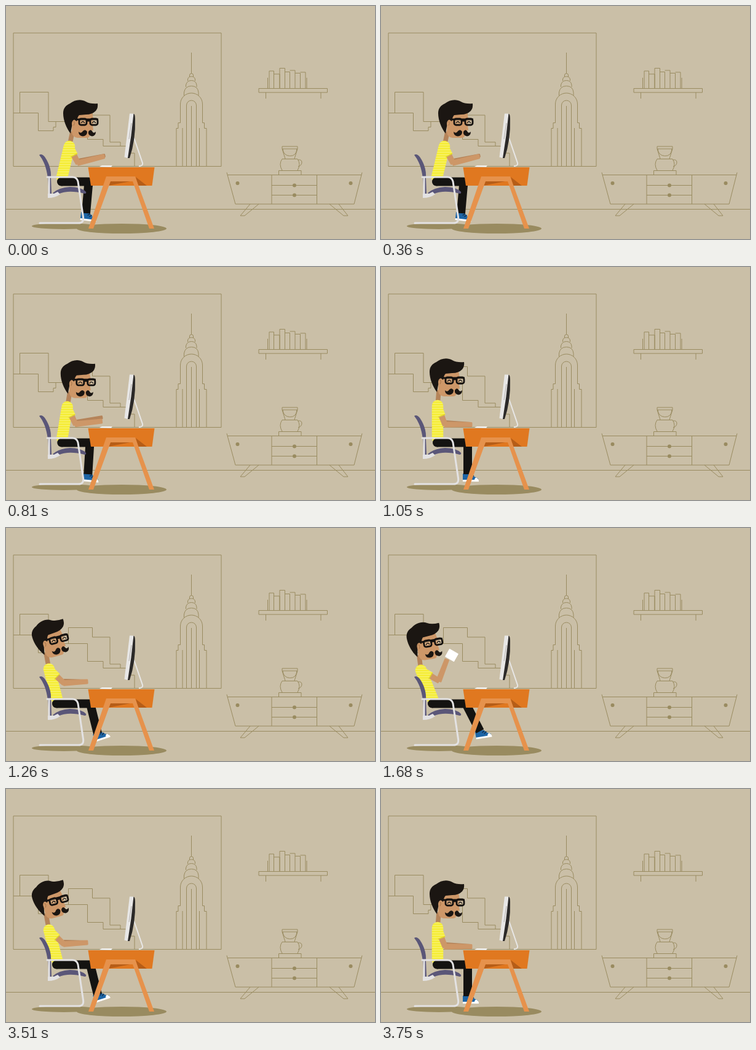
Recreate the animation shown at these times as an HTML page. Size 600x380 px, loop 3.81 s.

```html
<!DOCTYPE html>
<html lang="en">
<head>
<meta charset="utf-8">
<title>Desk break</title>
<style>
  html, body { margin: 0; width: 100%; height: 100%; overflow: hidden; background: #cabfa7; }
  svg { display: block; width: 600px; height: 380px; }
  .line { fill: none; stroke: #998b60; stroke-width: 1; }
  .dot { fill: #998b60; }
  .ink { fill: #1b1612; }
  .skin { fill: #cd9768; stroke: #cd9768; }
  .shade { fill: #b5845a; stroke: #b5845a; }
  .limb { stroke-width: 3; stroke-linejoin: round; }
  .metal { fill: none; stroke: #e3e2e3; stroke-width: 3; stroke-linejoin: round; stroke-linecap: round; }
</style>
</head>
<body>
<svg viewBox="0 0 600 380">
  <defs>
    <pattern id="knit" width="8" height="4" patternUnits="userSpaceOnUse">
      <rect width="8" height="4" fill="#f5ed3a"/>
      <rect y="2" width="8" height="1" fill="#f8f378"/>
    </pattern>
  </defs>
  <rect width="600" height="380" fill="#cabfa7"/>

  <g class="line">
    <path d="M0 331.5H600M12 44H350V261.5H12Z"/>
    <!-- skyline -->
    <path d="M12 174.5H52.5V203.5H77V197.5H81V188.5"/>
    <path d="M22.5 174V140.5H69V188.5H132.5V217.5H158V228.5H186"/>
    <path d="M101.5 188V162.5H140.5V178H169V222H186V228.5H196V240H209V262"/>
    <!-- tower -->
    <path d="M301.5 76V110M298.5 115V113Q298.5 110 301.5 110T304.5 113V115"/>
    <path d="M295.5 122V120Q296 115 301.5 115T307.5 120V122"/>
    <path d="M292.5 132V129Q294 121.5 301.5 121.5T310 129V132"/>
    <path d="M289.5 146V141Q291 130.5 301.5 130.5T313 141V146"/>
    <path d="M277 262V199.5H280V190.5H283.5V160A18 18 0 0 1 319.5 160V190.5H322.5V199.5H326V262"/>
    <path d="M293.5 262V162A8 8 0 0 1 309.5 162V262M287 199V262M301.5 163V262M314.500 199V262"/>
    <!-- shelf -->
    <path d="M411 134.5H522.5V141H411ZM422.5 141V151M512 141V151M425.5 134V117M489 134V117"/>
    <path d="M428 134V106H435.5V134M435.5 111H445V134M445 134V101.5H453.5V134M453.5 107.5H461.5V134M461.5 105H470V134M470 109.5H478.5V134M478.5 108H487V134"/>
    <!-- sideboard -->
    <path d="M359 271.5L373 323H566L579 271.5M360 275.5H578M432 276V323M505.5 276V323M432 292.5H505.5M432 308.5H505.5"/>
    <path d="M397 323L381 342H388L411 323M526 323L549 342H556L541 323"/>
    <!-- coffee maker -->
    <path d="M443.5 276V268.5H480V276M449 268Q443 258 449 249.5H474Q480 258 474 268M475 251Q481 250 481 255T475 262"/>
    <path d="M449 229H474V233H449ZM449 233L454 249M474 233L469 249M450 233Q451 244 461.5 244.5T473 233"/>
  </g>
  <g class="dot">
    <circle cx="376.5" cy="289" r="3"/><circle cx="560.5" cy="289" r="3"/>
    <circle cx="469" cy="292.5" r="3"/><circle cx="469" cy="308.5" r="3"/>
    <ellipse cx="94" cy="359" rx="52" ry="5"/>
    <ellipse cx="188" cy="363" rx="73" ry="8"/>
  </g>

  <!-- person -->
  <path id="neck" fill="none" stroke="#b5845a" stroke-width="7.5"/>
  <path id="farArm" class="shade limb"/>
  <path id="torso" fill="none" stroke="url(#knit)" stroke-width="18.5" stroke-linecap="round"/>
  <g id="head">
    <path d="M-14 -10H18L20 0L19 12L20 18L16 20L14 28Q13 31 9 31H-6Q-14 30 -15 22Z" fill="#cd9768"/>
    <path class="ink" d="M-17 24C-24 15 -29 2 -29 -9C-29 -17 -25 -22 -18 -25C-11 -31 0 -33 8 -28Q15 -24 27 -25Q28 -18 24 -13Q18 -7 8 -7L-3 -6Q-6 -3 -7 4L-12 2Q-15 10 -17 24Z"/>
    <ellipse cx="-11" cy="8" rx="3.5" ry="6" class="skin"/>
    <path d="M-12 4Q-9 7 -12 11" fill="none" stroke="#a87549"/>
    <g fill="none" stroke="#14110f">
      <path d="M-7 1H28M9 3H15" stroke-width="3"/>
      <g fill="#dcc09a" fill-opacity=".35" stroke-width="2.8">
        <rect x="-3" y="0" width="12" height="10" rx="3"/>
        <rect x="15" y="0" width="12" height="10" rx="3"/>
      </g>
      <path d="M0 7Q3 2 6 7M18 7Q21 2 24 7" stroke-width="1.3"/>
    </g>
    <path class="ink" d="M10 21Q7 16 3 20Q0 25 -4 21Q-4 28 3 28.500Q10 28 10 21ZM12 21Q15 16 18 20Q20 25 24 21Q24 28 18 28.500Q11 27 12 21Z"/>
  </g>
  <path id="upper" class="skin limb"/>
  <path id="fore" class="skin limb"/>
  <path id="sleeve" fill="none" stroke="url(#knit)" stroke-width="13"/>
  <path id="cuff" fill="none" stroke="#ddcf2b" stroke-width="1"/>
  <g id="cup"><rect x="-8.5" y="-7.5" width="17" height="15" rx="1" fill="#fff"/></g>

  <g id="shoe">
    <path d="M-8 -1H6L11 4L17 7V10H-8Z" fill="#1d65a6"/>
    <path d="M-8 9H11Q12 4 15 6Q18 8 18 12H-8Z" fill="#fff"/>
    <path d="M3 3L7 0M6 5L10 2" stroke="#16324e" stroke-width="1.5"/>
  </g>
  <path id="leg" fill="none" stroke="#141311" stroke-width="14" stroke-linejoin="round"/>
  <circle id="seat" cy="286.5" r="7" fill="#141311"/>

  <!-- chair -->
  <path d="M54 243Q58 240 63 246Q74 262 73 279L74 306L69 306Q70 262 54 243Z" fill="#5a5678"/>
  <path d="M76 305Q86 296 104 295Q122 295 130 303Q131 306 128 306Q112 302 100 303Q88 304 82 309Z" fill="#5a5678"/>
  <path d="M68 306H78L84 303L88 307Q80 313 68 313Z" fill="#e3e2e3"/>
  <path class="metal" d="M67 279H108Q115 279 117 286L125.5 344Q127 354 118 354H55M70 280V311"/>

  <!-- desk -->
  <path d="M133.5 263H241.5L237.5 293H138Z" fill="#e07820"/>
  <path d="M170 286H202L166 293ZM211 279L229 293H215Z" fill="#b65d17"/>
  <path d="M163 278H210L241 363H233L206 286H170L142 363H134Z" fill="#e6924c"/>
  <path d="M152 262L156 260H173L171 262.5Z" fill="#f2f1ef"/>

  <!-- monitor -->
  <path d="M208 215L222 256Q223 261 216 261" fill="none" stroke="#e8e7e6" stroke-width="2"/>
  <path d="M206 176Q210 174 210 184Q211 218 201 248L197 248Z" fill="#2b2928"/>
  <path d="M201 175.5H207.500Q204 212 198 248L192.500 246.500Z" fill="#e8e7e6"/>
  <path d="M204 191L200 217" stroke="#b9b6b4" stroke-width="1.2"/>
</svg>
<script>
const LOOP = 3810;
const KEYS = ['hx', 'hy', 'hr', 'sx', 'sy', 'wx', 'ex', 'ey', 'mx', 'my', 'dx', 'dy', 'kx', 'ax', 'ay', 'fr', 'cr'];
const pose = (...v) => Object.fromEntries(KEYS.map((k, i) => [k, v[i]]));

// head, shoulder, waist, elbow, near hand, far hand, knee, ankle, foot tilt, cup tilt
const POSES = {
  lean:  pose(122, 184, 0, 103, 229, 91, 117, 256, 159, 245.5, 161, 244, 134.5, 130, 338, 7, 45),
  sit:   pose(108, 180, 0, 92, 226, 92, 104, 257, 147, 257, 147, 256, 141, 141, 338, 0, 45),
  reach: pose(73, 179.5, -15, 70, 230, 83, 94, 253, 132, 250.5, 132, 250, 137, 149, 335, -18, 45),
  hold:  pose(72, 184, -10, 65, 232, 84, 96, 245, 125, 219, 125, 219, 138, 161, 331.5, -9, 45),
  sip:   pose(72, 184, -10, 65, 232, 84, 94, 249, 107, 215, 107, 215, 138, 161, 331.5, -9, 30)
};

// start time, from, to, mix, hand swing, cup shown
const STEPS = [0, 1, 2, 3, 4, 5, 6, 7].map(i => [i * 90, 'lean', 'lean', 0, Math.sin(i * Math.PI / 2), 0]);
STEPS.push(
  [690, 'lean', 'sit', .12, -.7, 0],
  [750, 'lean', 'sit', .3, -.3, 0],
  [840, 'lean', 'sit', .6, 0, 0],
  [900, 'lean', 'sit', .8, 0, 0],
  [990, 'lean', 'sit', .96, 0, 0],
  [1050, 'sit', 'sit', 0, 0, 0],
  [1140, 'sit', 'reach', .4, 0, 0],
  [1260, 'reach', 'reach', 0, 0, 0],
  [1380, 'reach', 'hold', .6, 0, 1],
  [1500, 'hold', 'hold', 0, 0, 1],
  [1680, 'sip', 'sip', 0, 0, 1],
  [3120, 'hold', 'hold', 0, 0, 1],
  [3300, 'hold', 'reach', .5, 0, 1],
  [3420, 'reach', 'reach', 0, 0, 0],
  [3540, 'reach', 'sit', .5, 0, 0],
  [3660, 'reach', 'sit', .85, 0, 0],
  [3750, 'sit', 'sit', 0, 0, 0]
);

const $ = id => document.getElementById(id);
const set = (id, name, value) => $(id).setAttribute(name, value);
const line = (...pts) => 'M' + pts.map(p => p.join(' ')).join('L');
const along = (a, b, k) => [a[0] + (b[0] - a[0]) * k, a[1] + (b[1] - a[1]) * k];

// tapered limb; its outline adds the rounded ends
function limb(a, b, wa, wb) {
  const len = Math.hypot(b[0] - a[0], b[1] - a[1]) || 1;
  const nx = (a[1] - b[1]) / len / 2, ny = (b[0] - a[0]) / len / 2;
  const side = (p, w) => [p[0] + nx * w, p[1] + ny * w];
  return line(side(a, wa), side(b, wb), side(b, -wb), side(a, -wa)) + 'Z';
}

function draw([, from, to, mix, swing, cup]) {
  const p = {};
  for (const k of KEYS) p[k] = POSES[from][k] + (POSES[to][k] - POSES[from][k]) * mix;

  const shoulder = [p.sx, p.sy], elbow = [p.ex, p.ey];
  const hand = [p.mx, p.my - swing * 8.5];
  const farElbow = [p.ex + 1, p.ey - 3], farHand = [p.dx - 1, p.dy + swing * 8];
  const r = p.hr * Math.PI / 180, c = Math.cos(r), s = Math.sin(r);
  const nape = [p.hx - 14 * c - 21 * s, p.hy - 14 * s + 21 * c];

  set('neck', 'd', line(nape, shoulder));
  set('head', 'transform', `translate(${p.hx} ${p.hy}) rotate(${p.hr})`);
  set('torso', 'd', line(shoulder, [p.wx + .01, 279]));

  set('farArm', 'd', limb(farElbow, farHand, 5, 3));
  set('farArm', 'visibility', cup ? 'hidden' : 'visible');
  set('upper', 'd', limb(along(shoulder, elbow, .4), elbow, 7, 6));
  set('fore', 'd', limb(elbow, hand, 6.5, 5));

  const hem = along(shoulder, elbow, .55);
  set('sleeve', 'd', line(shoulder, hem));
  set('cuff', 'd', limb(along(shoulder, elbow, .53), hem, 11, 11));

  set('cup', 'transform', `translate(${p.mx + 8} ${p.my - 7.5}) rotate(${p.cr})`);
  set('cup', 'visibility', cup ? 'visible' : 'hidden');

  set('seat', 'cx', p.wx - 1);
  set('leg', 'd', line([p.wx - 1, 286.5], [p.kx, 286.5], [p.ax, p.ay]));
  set('shoe', 'transform', `translate(${p.ax} ${p.ay}) rotate(${p.fr})`);
}

const start = performance.now();
let shown;
function tick() {
  const t = (performance.now() - start) % LOOP;
  const step = STEPS.findLast(s => s[0] <= t) || STEPS[0];
  if (step !== shown) draw(shown = step);
  requestAnimationFrame(tick);
}
tick();
</script>
</body>
</html>
```
